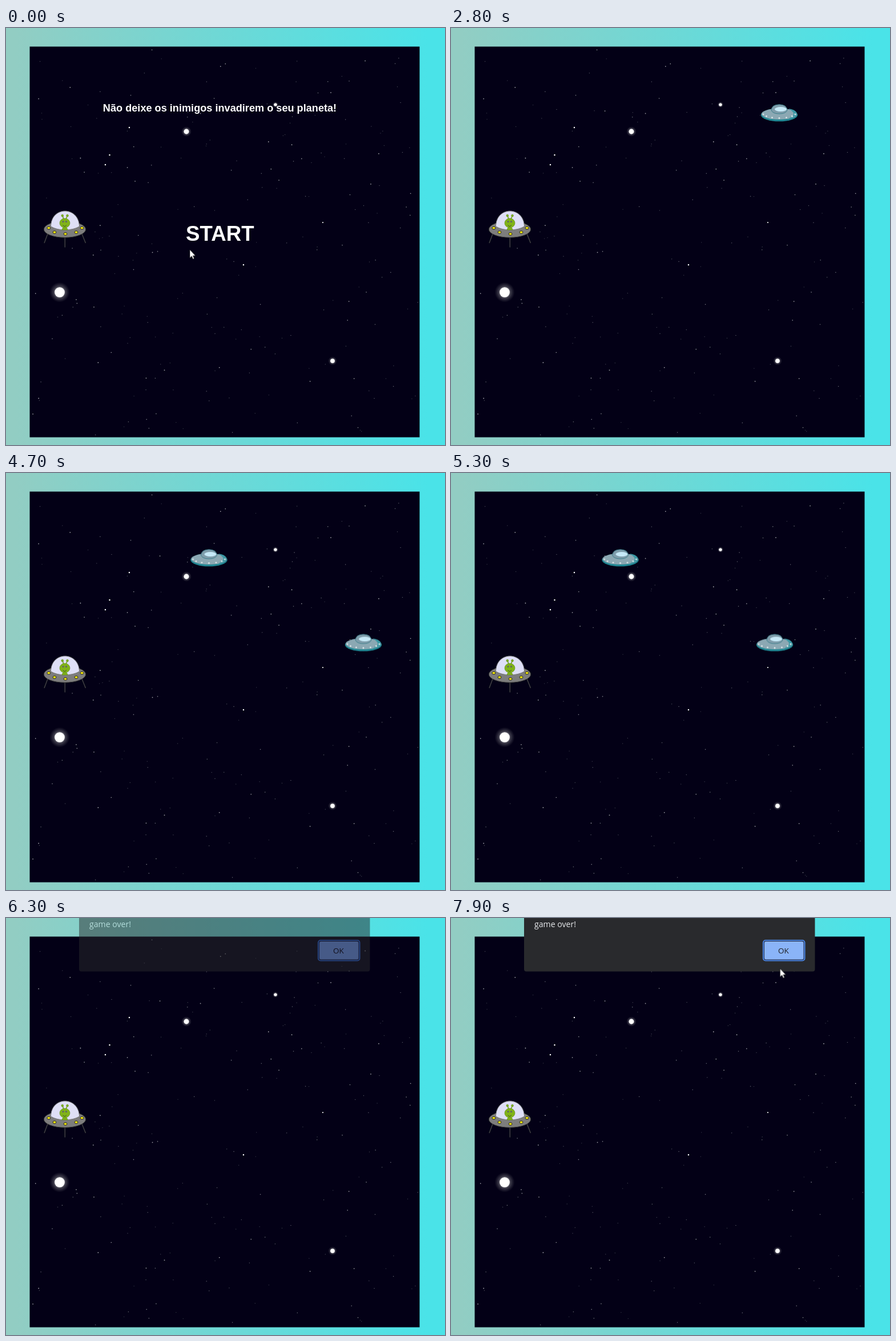
An HTML page for the animation above (8000 ms loop, 769 px wide and 729 px high).

```html
<!DOCTYPE html>
<html lang="pt">
<head>
<meta charset="utf-8">
<title>Invasores</title>
<style>
html, body { margin: 0; width: 100%; height: 100%; overflow: hidden; }
body { background: linear-gradient(to right, #92cdc3 2%, #4ae3e8 96%); }
svg { display: block; width: 100%; height: 100%; }
.title { font: bold 18.15px "Liberation Sans", Arial, sans-serif; fill: #fff; text-anchor: middle; }
.start { font-size: 36.7px; }
.msg { font: 14.1px "Open Sans", sans-serif; fill: #e8eaed; }
.ok { font: 13.5px "Open Sans", sans-serif; fill: #202124; text-anchor: middle; }

.anim { animation: 8s step-end -4ms infinite; }
#intro { animation-name: intro; }
#first { animation-name: first; }
#second { animation-name: second; }
#dialog { animation-name: dialog; }
#cursor { animation-name: cursor; }
.fly { animation-name: fly; }

@keyframes intro { 0% { opacity: 1; } 5%, 100% { opacity: 0; } }
@keyframes first { 0% { opacity: 0; } 35% { opacity: 1; } 77.5%, 100% { opacity: 0; } }
@keyframes second { 0% { opacity: 0; } 55% { opacity: 1; } 77.5%, 100% { opacity: 0; } }
@keyframes dialog { 0% { opacity: 0; } 78.75% { opacity: .5; } 80%, 100% { opacity: 1; } }

/* One step every 100 ms: fast entry, short pause, steady flight */
@keyframes fly {
  0%, 35% { transform: translateX(575px); animation-timing-function: steps(9); }
  46.25% { transform: translateX(438.5px); animation-timing-function: steps(2); }
  48.75% { transform: translateX(434px); animation-timing-function: steps(22); }
  76.25%, 100% { transform: translateX(218px); }
}
@keyframes cursor {
  0% { transform: translate(322px, 387.5px); }
  1.25% { transform: translate(322px, 387.5px); animation-timing-function: steps(3); }
  5% { transform: translate(331px, 365px); animation-timing-function: steps(6); }
  12.5% { transform: translate(632px, 506px); }
  13.75% { transform: translate(632px, 506px); animation-timing-function: steps(2); }
  16.25% { transform: translate(619px, 509px); }
  17.5% { transform: translate(-99px, 0); }
  93.75% { transform: translate(748px, 335px); }
  95% { transform: translate(748px, 335px); animation-timing-function: steps(3); }
  98.75%, 100% { transform: translate(576.5px, 88.5px); }
}
</style>
</head>
<body>
<svg viewBox="0 0 769 729" preserveAspectRatio="none">
  <defs>
    <radialGradient id="glow">
      <stop offset=".4" stop-color="#fff" stop-opacity=".6"/>
      <stop offset=".6" stop-color="#bbb" stop-opacity=".3"/>
      <stop offset="1" stop-color="#999" stop-opacity="0"/>
    </radialGradient>
    <g id="enemy">
      <ellipse cy="152" rx="32.2" ry="11.3" fill="#218793"/>
      <ellipse cy="150.3" rx="31" ry="9.7" fill="#8ba8b3"/>
      <path d="M17 158Q30 155 31 149Q28 142 16 141Q27 147 25 152Z" fill="#3b98a4"/>
      <path d="M-14 144Q-13 133.8 0 133.8T14 144Q11 150 0 150T-14 144Z" fill="#7f9dab" stroke="#3f808d"/>
      <ellipse cx="2.5" cy="142" rx="10.5" ry="4" fill="#c6e9f7"/>
      <g id="bulbs" fill="#dce8ea"></g>
    </g>
  </defs>

  <rect x="41.5" y="32.500" width="683" height="683" fill="#030016"/>
  <g id="sky" fill="#fff"></g>

  <g id="player" stroke="#333">
    <path d="M73 360L67 376M103.300 364V383.500M133 360L139.500 376" stroke="#444" stroke-width="1.400" fill="none"/>
    <ellipse cx="103" cy="352" rx="36.700" ry="14.300" fill="#7d7d7d"/>
    <path d="M78.500 347C79 311 127.500 311 128.500 347Q118 353 103.500 353T78.500 347Z" fill="#dedff6" stroke="#777"/>
    <g fill="#80b318" stroke="#5b8a14" stroke-width=".6">
      <path d="M101 334L99 328M105 334L107.500 328" fill="none" stroke="#6d9c18" stroke-width="1.500"/>
      <circle cx="98.800" cy="328" r="1.900"/><circle cx="107.500" cy="328" r="1.900"/>
      <path d="M98 353Q99 348 103 348T108 353Z"/>
      <ellipse cx="103" cy="341" rx="9" ry="8.200"/>
    </g>
    <g fill="#65705c" stroke="none"><circle cx="100" cy="338.500" r="1.800"/><circle cx="105.500" cy="338.500" r="1.800"/></g>
    <path d="M99.500 344.500Q102.500 349 106 344.500" fill="none" stroke-width=".8"/>
    <g id="lamps" fill="#f3e80c" stroke="#262626"></g>
  </g>

  <g id="intro" class="anim">
    <text class="title" x="374.500" y="146">Não deixe os inimigos invadirem o seu planeta!</text>
    <text class="title start" x="374.800" y="371.500">START</text>
  </g>

  <g id="first" class="anim"><g class="anim fly"><use href="#enemy"/></g></g>
  <g transform="translate(270.5 148.3)"><g id="second" class="anim"><g class="anim fly"><use href="#enemy"/></g></g></g>

  <g id="dialog" class="anim">
    <path d="M128 0H637.500V89.500a4 4 0 0 1-4 4H132a4 4 0 0 1-4-4Z" fill="#292a2d"/>
    <text class="msg" x="146" y="16">game over!</text>
    <rect x="547" y="39" width="72.500" height="35.500" rx="4" fill="#202840" stroke="#4a82dc" stroke-width="2.200"/>
    <rect x="549" y="41" width="68.500" height="31.500" rx="2.500" fill="#8ab4f8"/>
    <text class="ok" x="582.500" y="62">OK</text>
  </g>

  <path id="cursor" class="anim" d="M0 0V14.500L3.300 11.400 5.500 16.500 7.700 15.500 5.500 10.700H10Z" fill="#fff" stroke="#000" stroke-width=".6"/>
</svg>
<script>
function dot(parent, cx, cy, rx, ry = rx, attrs = {}) {
  const e = document.createElementNS("http://www.w3.org/2000/svg", "ellipse");
  for (const [k, v] of Object.entries({ cx, cy, rx, ry, ...attrs })) e.setAttribute(k, v);
  document.getElementById(parent).append(e);
}

// Evenly spread lights along the lower rim of a saucer
function rim(parent, count, spread, cx, cy, a, b, rx, ry) {
  for (let i = 0; i < count; i++) {
    const t = spread * (2 * i / (count - 1) - 1);
    dot(parent, cx + a * Math.sin(t), cy + b * Math.cos(t), rx, ry);
  }
}
rim("bulbs", 7, 1.36, 0, 149, 28.5, 8.5, 1.4, 1.4);
rim("lamps", 5, 1.4, 104, 347.5, 29.5, 12.5, 3, 2.3);

let seed = 41;
const rnd = () => (seed = seed * 16807 % 2147483647) / 2147483647;
for (let i = 0; i < 230; i++) {
  const shine = rnd() ** 2;
  dot("sky", 43 + rnd() * 680, 34 + rnd() * 680, .65 + shine * .25, undefined, { opacity: .25 + shine * .4 });
}

// Main stars: x, y, radius; the large ones glow
const stars = [[94, 462, 8.8], [316, 181, 4.4], [572, 582, 3.8], [472, 134, 2.6],
  [174, 239, 1.25], [181.5, 222, 1.25], [216, 174, 1.25], [416, 414, 1.25], [555, 340, 1.1]];
for (const [x, y, r] of stars) {
  if (r > 2) dot("sky", x, y, r * 2, r * 2, { fill: "url(#glow)" });
  dot("sky", x, y, r);
}
</script>
</body>
</html>
```
